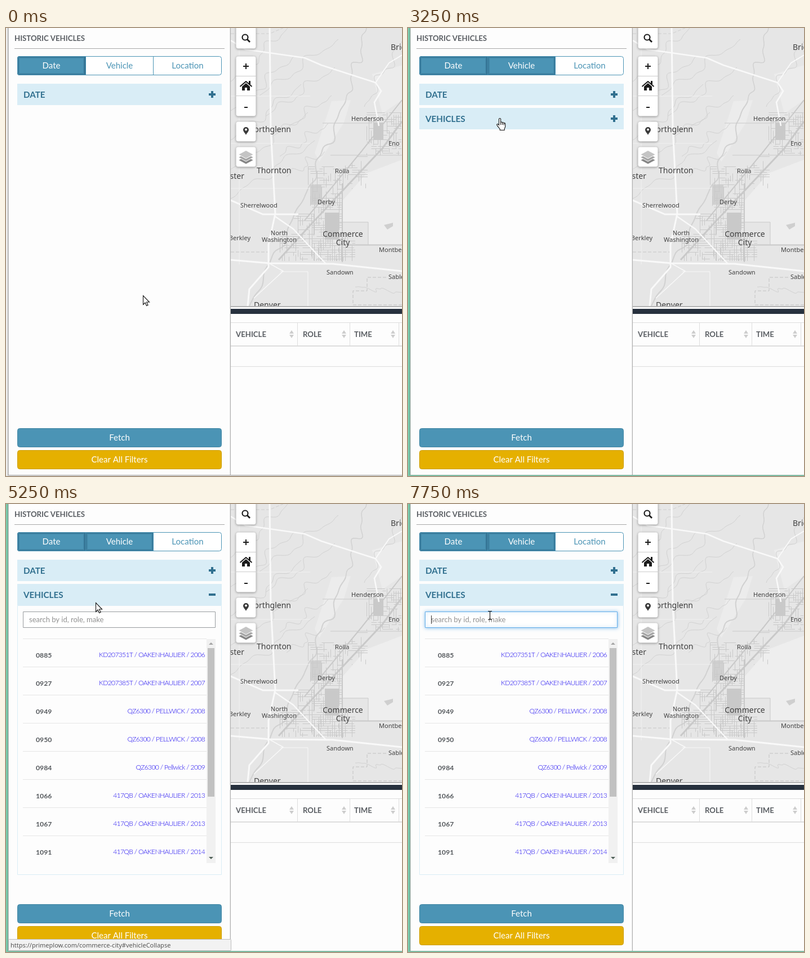
Recreate the animation shown at these times as an HTML page with a canvas. Size 703 by 796 pixels, loop 8 s.

```html
<!DOCTYPE html>
<html lang="en">
<head>
<meta charset="utf-8">
<title>Historic vehicles</title>
<style>
html, body { margin: 0; width: 100%; height: 100%; overflow: hidden; background: #fdfdfd; }
canvas { display: block; width: 703px; height: 796px; }
</style>
</head>
<body>
<canvas id="stage"></canvas>
<script>
const W = 703, H = 796, LOOP = 8000, STEP = 250;
const BLUE = '#4b94b5', PALE = '#d9edf6', INK = '#31708f', GRAY = '#c9c9c9';
const UI = 'Lato, sans-serif', MAP = '"Noto Sans", sans-serif';
const dpr = window.devicePixelRatio || 1;

function layer(canvas) {
  canvas.width = W * dpr;
  canvas.height = H * dpr;
  const c = canvas.getContext('2d');
  c.scale(dpr, dpr);
  return c;
}
const screen = layer(document.getElementById('stage'));
const backdrop = document.createElement('canvas');
let g = layer(backdrop);

function rect(x, y, w, h, fill) {
  g.fillStyle = fill;
  g.fillRect(x, y, w, h);
}
function box(x, y, w, h, r, fill, stroke) {
  g.beginPath();
  g.roundRect(x + .5, y + .5, w - 1, h - 1, r);
  if (fill) { g.fillStyle = fill; g.fill(); }
  if (stroke) { g.strokeStyle = stroke; g.lineWidth = 1; g.stroke(); }
}
function text(s, x, y, font, fill, align = 'left', spacing = 0) {
  g.font = font;
  g.fillStyle = fill;
  g.textAlign = align;
  g.letterSpacing = spacing + 'px';
  g.fillText(s, x, y);
}
function trace(p) {
  g.beginPath();
  for (let i = 0; i < p.length; i += 2) g.lineTo(p[i], p[i + 1]);
}
function poly(p, fill) {
  trace(p);
  g.fillStyle = fill;
  g.fill();
}
function line(p, color, width = 1, dash = []) {
  trace(p);
  g.strokeStyle = color;
  g.lineWidth = width;
  g.setLineDash(dash);
  g.stroke();
  g.setLineDash([]);
}
function glow(color, blur, dy = 0) {
  g.shadowColor = color;
  g.shadowBlur = blur * dpr;
  g.shadowOffsetY = dy * dpr;
}
function random(seed) {
  seed = Math.floor(seed) + 1;
  return () => (seed = (seed * 16807) % 2147483647) / 2147483647;
}
// A winding stream between two points.
function creek(x1, y1, x2, y2, sway = 10, width = 1) {
  const r = random(x1 * 91 + y1 * 7 + x2);
  const a = r() * 6, b = r() * 6, n = 40, p = [];
  for (let i = 0; i <= n; i++) {
    const u = i / n;
    const off = sway * Math.sin(u * Math.PI) * (Math.sin(u * 14 + a) + .5 * Math.sin(u * 31 + b));
    p.push(x1 + (x2 - x1) * u + off * .7, y1 + (y2 - y1) * u + off * .6);
  }
  line(p, '#d1d1d1', width);
}
// Short street segments on a loose grid inside a box.
function streets(x, y, w, h, density) {
  const r = random(x * 31 + y);
  for (let i = w * h * density; i > 0; i--) {
    const sx = x + Math.floor(r() * w / 4) * 4 + .5;
    const sy = y + Math.floor(r() * h / 4) * 4 + .5;
    const len = 6 + r() * 20;
    if (r() < .5) line([sx, sy, Math.min(sx + len, x + w), sy], GRAY);
    else line([sx, sy, sx, Math.min(sy + len, y + h)], GRAY);
  }
}

function drawLand() {
  rect(399, 0, 304, 496, '#e6e6e6');
  poly([703, 234, 640, 258, 598, 306, 598, 345, 643, 345, 643, 385, 703, 385], '#eeeeee');
  poly([578, 130, 612, 128, 600, 168, 556, 238, 548, 222], '#ececec');
  poly([650, 82, 703, 66, 703, 128, 668, 152], '#ececec');
  poly([671, 350, 687, 346, 687, 352, 677, 358], '#cfcfcf');

  for (let i = 0; i < 5; i++) {
    creek(399, 95 + i * 52, 500 + i * 12, i * 50, 9);
    creek(450 + i * 12, 120 + i * 36, 590 - i * 6, 20 + i * 50, 9);
  }
  creek(640, 0, 603, 130, 9, 1.5);
  creek(603, 130, 530, 300, 8, 2);
  creek(530, 300, 432, 494, 6, 2);
  creek(703, 24, 636, 140);
  creek(620, 460, 703, 470, 7);

  const pale = '#f1f1f1';
  line([414, 0, 414, 420], pale);
  for (const y of [121, 205, 285]) line([399, y, 540, y], pale);
  line([487, 433, 536, 433, 536, 494], '#f8f8f8');
  const dash = [6, 3];
  line([399, 10, 468, 10, 492, 0], '#cfcfcf', 1, dash);
  line([399, 398, 466, 398], '#c6c6c6', 1, dash);
  line([703, 492, 616, 492, 616, 467, 641, 467, 641, 443, 676, 443], '#c2c2c2', 1, dash);
}

function drawStreets() {
  rect(566, 328, 25, 48, GRAY);
  rect(540, 278, 20, 36, '#d0d0d0');
  rect(652, 168, 18, 30, GRAY);
  streets(536, 246, 60, 70, .018);
  streets(543, 310, 54, 104, .032);
  streets(482, 366, 138, 48, .014);
  streets(506, 330, 42, 60, .014);
  streets(640, 150, 62, 76, .02);
  streets(598, 220, 44, 66, .009);
  line([484, 412, 545, 345, 668, 214, 703, 166], GRAY, 3);
  line([530, 342, 632, 218, 703, 128], GRAY, 2);
  line([562, 169, 650, 169], GRAY);
  line([576, 226, 703, 226], GRAY);
  line([590, 345, 643, 345, 643, 385], GRAY);
  line([597, 276, 597, 416], GRAY, 2);
  line([597, 385.5, 703, 385.5], GRAY, 2);
}

function drawHighways() {
  const road = '#f9f9f9';
  g.lineJoin = 'round';
  line([399, 22, 425, 38, 530, 53, 560, 66, 656, 97, 666, 112, 654, 132, 662, 174], road, 2.5);
  line([656, 97, 680, 62, 703, 48], road, 2);
  line([468, 0, 470, 180, 478, 330, 466, 385, 466, 425, 432, 464, 429, 494], road, 3);
  line([399, 306, 456, 331, 519, 331], road, 3);
  line([478, 335, 510, 357, 568, 419], road, 2.5);
  line([399, 412, 468, 418, 580, 419, 703, 432], road, 3);
  line([467, 418, 492, 432, 440, 480], road, 1.5);
}

function label(name, x, y, size = 11, align = 'left') {
  text(name, x, y, size + 'px ' + MAP, '#404040', align);
}
function drawLabels() {
  label('Brighton', 683, 39, 14);
  label('Northglenn', 506, 185, 14, 'right');
  label('Thornton', 445, 258, 14);
  label('Westminster', 423, 268, 14, 'right');
  label('Commerce', 598, 371, 14, 'center');
  label('City', 598, 386, 14, 'center');
  label('Denver', 440, 497, 14);
  label('Henderson', 613, 165);
  label('Eno', 679, 209);
  label('Rolla', 584, 258);
  label('Derby', 553, 313);
  label('Sherrelwood', 416, 319);
  label('North', 485, 368, 11, 'center');
  label('Washington', 485, 380, 11, 'center');
  label('Berkley', 434, 377, 11, 'right');
  label('Montbello', 662, 398);
  label('Sandown', 569, 438);
  label('Sable', 679, 446);
}

function drawTools() {
  for (const [y, h] of [[-6, 43], [50, 107], [166, 36], [211, 36]]) {
    glow('rgba(0,0,0,.4)', 4, 1);
    box(408, y, 36, h, 4, '#fff');
    glow('transparent', 0);
  }
  rect(408, 85, 36, 1, '#ccc');
  rect(408, 120, 36, 1, '#ccc');
  const ink = '#1c1c1c';
  g.beginPath();
  g.arc(424.5, 16.5, 5, 0, 7);
  g.strokeStyle = ink;
  g.lineWidth = 2.2;
  g.stroke();
  line([428, 20, 433, 25], ink, 2.8);
  rect(421, 67, 10, 2, ink);
  rect(425, 63, 2, 10, ink);
  rect(423, 140, 6, 2, ink);
  poly([419, 104, 426, 98, 433, 104, 433, 111, 419, 111], ink);
  rect(424, 106, 4, 5, '#fff');
  line([415.5, 104, 426, 95, 436.5, 104], ink, 2);
  rect(431, 94, 3, 6, ink);
  g.fillStyle = '#3a3a3a';
  g.fill(new Path2D('M426 190C424 186 421 184 421 181a5 5 0 0 1 10 0c0 3-3 5-5 9zM426 178.6a2 2 0 1 0 .01 0z'), 'evenodd');
  for (let i = 0; i < 3; i++) {
    const y = 235 - i * 5;
    poly([413, y, 426, y - 7, 439, y, 426, y + 7], `hsl(0 0% ${53 + i * 12}%)`);
    line([413, y, 426, y + 7, 439, y], '#fff');
  }
}

function drawTable() {
  rect(399, 494, 304, 302, '#fdfdfd');
  rect(399, 494, 304, 2, '#b4b4b4');
  rect(399, 499, 304, 9, '#27313e');
  rect(399, 523, 304, 1, '#ddd');
  rect(399, 564, 304, 2, '#ddd');
  rect(399, 601, 304, 1, '#ddd');
  for (const [name, x, edge] of [['VEHICLE', 408, 517], ['ROLE', 527, 610], ['TIME', 618, 697]]) {
    text(name, x, 549, 'bold 13.2px ' + UI, '#595d62');
    rect(edge, 523, 1, 41, '#ddd');
    const s = edge - 10;
    poly([s - 4, 543, s, 537, s + 4, 543], '#cdcdcd');
    poly([s - 4, 545, s, 551, s + 4, 545], '#cdcdcd');
  }
}

function drawButton(name, y, fill, border) {
  box(20, y, 363, 34, 4, fill, border);
  text(name, 201.5, y + 22, '15px ' + UI, '#fff', 'center');
}

function paintBackdrop() {
  rect(0, 0, W, H, '#fdfdfd');
  g.save();
  g.beginPath();
  g.rect(399, 0, 304, 494);
  g.clip();
  drawLand();
  drawStreets();
  drawHighways();
  drawLabels();
  drawTools();
  g.restore();
  drawTable();
  rect(397, 0, 1, 794, '#e6e6e6');
  rect(398, 0, 1, 794, '#b0b0b0');
  text('HISTORIC VEHICLES', 15, 23, 'bold 13.2px ' + UI, '#595d62');
  rect(15, 36, 373, 1, '#a8a8a8');
  drawButton('Fetch', 711, BLUE, '#4386a4');
  drawButton('Clear All Filters', 750, '#e5b000', '#cb9c00');
}

function drawEdge(green) {
  rect(0, 0, 3, H, green ? '#79c9ab' : '#ededed');
  rect(3, 0, 1, 795, green ? '#6d9d8b' : '#a4a4a4');
  rect(4, 0, 1, 794, '#cfcfcf');
  rect(3, 794, 700, 1, green ? '#7fae9c' : '#a4a4a4');
  rect(0, 795, W, 1, green ? '#79c9ab' : '#e4e4e4');
}

function drawTab(name, x, state) {
  const w = 121, on = state !== 'off';
  if (on) rect(x, 50, w, 34, BLUE);
  if (state === 'pressed')
    for (let i = 0; i < 4; i++)
      box(x + i, 50 + i, w - 2 * i, 34 - 2 * i, 0, null, `rgba(20,70,100,${.5 - i * .12})`);
  text(name, x + w / 2, 72, '15px ' + UI, on ? '#fff' : BLUE, 'center');
}
function drawTabs(vehicle) {
  box(20, 50, 363, 34, 4, '#fff');
  g.save();
  g.beginPath();
  g.roundRect(20, 50, 363, 34, 4);
  g.clip();
  drawTab('Date', 20, 'pressed');
  drawTab('Vehicle', 141, vehicle);
  drawTab('Location', 262, 'off');
  g.restore();
  rect(141, 50, 1, 34, BLUE);
  rect(261, 50, 1, 34, BLUE);
  box(20, 50, 363, 34, 4, null, BLUE);
}

function drawHeader(name, y, open) {
  rect(20, y, 363, 38, PALE);
  text(name, 31, y + 25, 'bold 15.2px ' + UI, INK);
  rect(360, y + 17, 12, 4, INK);
  if (!open) rect(364, y + 13, 4, 12, INK);
}

const VEHICLES = `0885 KD207351T / OAKENHAULIER / 2006
0927 KD207385T / OAKENHAULIER / 2007
0949 QZ6300 / PELLWICK / 2008
0950 QZ6300 / PELLWICK / 2008
0984 QZ6300 / Pellwick / 2009
1066 417QB / OAKENHAULIER / 2013
1067 417QB / OAKENHAULIER / 2013
1091 417QB / OAKENHAULIER / 2014`.split('\n');

function drawList(t) {
  const settled = t >= 4750;
  box(20, 180, 363, settled ? 479 : 459, 0, '#fdfdfd', PALE);
  if (t >= 6750) glow('rgba(102,175,233,.8)', 6);
  box(30, 191, 342, 29, 0, '#fff', t < 6500 ? '#979b9e' : t < 6750 ? '#7ba9c6' : '#66afe9');
  glow('transparent', 0);
  text('search by id, role, make', 41, 210, '13px ' + UI, '#909090');
  const caret = t >= 6500 && Math.floor((t - 6500) / 500) % 2 === 0;
  if (caret) rect(41, 198, 1, 15, '#333');
  VEHICLES.forEach((row, i) => {
    const y = 240 + i * 50;
    rect(30, y - 1, 326, 1, '#e6e6e6');
    text(row.slice(0, 4), 53, y + 33, 'bold 12.2px ' + UI, '#54585c');
    text(row.slice(5), 353, y + 32, '300 12px ' + UI, '#1400f0', 'right', -.6);
  });
  if (!settled) return;
  rect(356, 240, 16, 398, '#f1f1f1');
  rect(358, 256, 12, 264, '#c1c1c1');
  poly([360, 250, 364, 246, 368, 250], '#a3a3a3');
  poly([360, 627, 364, 631, 368, 627], '#4f5f57');
}

function drawStatus(alpha) {
  g.globalAlpha = alpha;
  box(4, 773, 396, 21, 1, '#f2f2f2', '#bdbdbd');
  text('https://primeplow.com/commerce-city#vehicleCollapse', 8, 788, '11px ' + MAP, '#555');
  g.globalAlpha = 1;
}

const ARROW = new Path2D('M.5 .5V16.5L4 13L6.5 18.5L9 17.5L6.6 12H11.5Z');
const HAND = new Path2D('M4.5 2C4.5 0 7.6 0 7.6 2V8C7.9 6.5 10.4 6.7 10.5 8.4 11 7.2 13.2 7.6 13.3 9.2 13.9 8.3 15.7 8.8 15.7 10.5V15C15.7 17 14.2 18 14.2 19.5V21.5H6.2V19.5C5 17.5 2 15 .8 12.3 .2 10.7 2 10 3.2 11.2L4.5 12.5Z');
const KNUCKLES = new Path2D('M7.6 8V12M10.5 8.4V12M13.3 9.2V12.5');
const BEAM = new Path2D('M0 .5H2.5L3.5 1.5 4.5 .5H7M3.5 1.5V14.5M0 15.5H2.5L3.5 14.5 4.5 15.5H7');

const easeOut = power => u => 1 - (1 - u) ** power;
const easeInOut = u => u * u * (3 - 2 * u);
// Pointer strokes: start, end, target point, easing of x and of y.
const MOVES = [
  [0, 1750, 202, 67, easeOut(20), easeOut(4.8)],
  [2250, 3250, 163, 160, easeInOut, easeInOut],
  [5000, 6500, 153, 195, easeOut(3), easeOut(3)],
  [6750, 7000, 142, 190, easeInOut, easeInOut]
];
function pointerAt(t) {
  let x = 243, y = 475;
  for (const [from, to, tx, ty, ex, ey] of MOVES) {
    const u = Math.min(1, Math.max(0, (t - from) / (to - from)));
    x += (tx - x) * ex(u);
    y += (ty - y) * ey(u);
  }
  return [Math.round(x), Math.round(y)];
}
function drawPointer(t) {
  const [x, y] = pointerAt(t);
  g.save();
  g.translate(x, y);
  g.strokeStyle = '#111';
  g.lineWidth = 1.1;
  g.fillStyle = '#fff';
  if (t >= 5500) {
    g.stroke(BEAM);
  } else if (t >= 1000 && t < 5250) {
    g.translate(-6, 0);
    g.fill(HAND);
    g.stroke(HAND);
    g.stroke(KNUCKLES);
  } else {
    g.fill(ARROW);
    g.stroke(ARROW);
  }
  g.restore();
}

function render(t) {
  g.drawImage(backdrop, 0, 0, W, H);
  drawEdge(t >= 2000);
  drawTabs(t < 1000 ? 'off' : t < 2000 ? 'hover' : 'pressed');
  drawHeader('DATE', 99, false);
  if (t >= 4500) drawList(t);
  if (t >= 2000) drawHeader('VEHICLES', 142, t >= 4750);
  if (t >= 3500 && t < 5750) drawStatus(t < 5500 ? 1 : .5);
  drawPointer(t);
}

paintBackdrop();
g = screen;
const start = performance.now();
function tick() {
  const t = (performance.now() - start) % LOOP;
  render(Math.floor(t / STEP) * STEP);
  requestAnimationFrame(tick);
}
tick();
</script>
</body>
</html>
```
